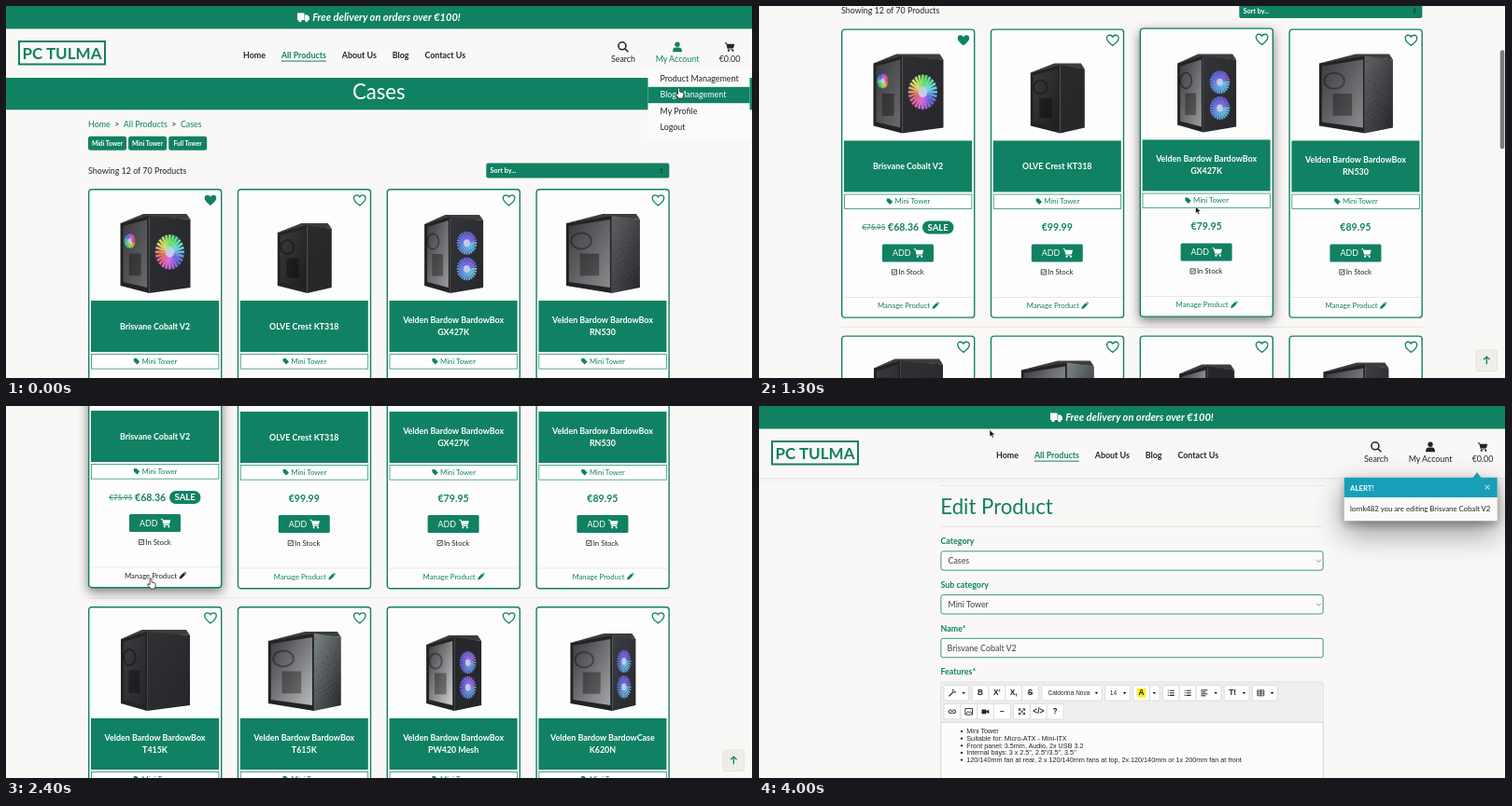
Write an HTML page that moves like this. It is 800 px wide and 399 px high and loops after 4300 ms.

```html
<!DOCTYPE html>
<html lang="en">
<head>
<meta charset="utf-8">
<title>Shop admin demo</title>
<style>
html, body { margin: 0; width: 100%; height: 100%; overflow: hidden; background: #faf8f6; }
svg { display: block; }
text { font-family: Lato, sans-serif; fill: #212529; white-space: pre; }
.sans { font-family: "Liberation Sans", Arial, sans-serif; }
.b { font-weight: 700; }
.i { font-style: italic; }
.m { text-anchor: middle; }
.g { fill: #118163; }
.w { fill: #fff; }
.card.hover { filter: drop-shadow(0 4px 6px rgba(0, 0, 0, .5)); }
.row.hover rect { fill: #118163; }
.row.hover text { fill: #fff; }
.manage.hover * { fill: #212529; }
.alert { filter: drop-shadow(0 4px 5px rgba(0, 0, 0, .3)) drop-shadow(0 12px 16px rgba(0, 0, 0, .4)); }
</style>
</head>
<body>
<svg id="stage" width="800" height="399" viewBox="0 0 800 399"></svg>
<script>
const GREEN = '#118163', DARK = '#212529', PAPER = '#faf8f6';
const LOOP = 4300, STEP = 100;

const txt = (x, y, s, cls = '', size = 8.89, more = '') =>
  `<text x="${x}" y="${y}" class="${cls}" font-size="${size}" ${more}>${s}</text>`;
const rect = (x, y, w, h, fill, more = '') =>
  `<rect x="${x}" y="${y}" width="${w}" height="${h}" fill="${fill}" ${more}/>`;
const poly = (pts, fill) => `<polygon points="${pts.join(' ')}" fill="${fill}"/>`;
const group = (body, more = '') => `<g ${more}>${body}</g>`;
const rule = (x1, y, x2, color = '#e4e1de') =>
  `<path d="M${x1} ${y}H${x2}" stroke="${color}" stroke-width=".8"/>`;
// Words on one line, each following the last after a gap
const flow = (x, y, words, gap, cls, lit) => txt(x, y, words.map((s, n) =>
  `<tspan dx="${n && gap}"${lit(n) ? ` fill="${GREEN}" style="fill:${GREEN}"` : ''}>${s}</tspan>`).join(''), cls);

const dot = (x, y, r) => `<circle cx="${x}" cy="${y}" r="${r}"/>`;
const stroke = (d, w) => `<path d="${d}" fill="none" stroke="currentColor" stroke-width="${w}"/>`;
const solid = d => `<path d="${d}"/>`;
const HEART = 'M0 5.6C-9-.5-6.6-5.5-3.3-5.5Q-1-5.5 0-3.6Q1-5.5 3.3-5.5C6.6-5.5 9-.5 0 5.6Z';
const ICONS = {
  truck: solid('M-6.5-4.5h7.5v7.5h-7.5zM1.6-2.6h2.7l2.2 2.6v3h-4.9z') + dot(-3.5, 3.6, 1.7) + dot(3.4, 3.6, 1.7),
  search: stroke('M2 2L5.3 5.3M2.9-1.2A4 4 0 1 1-5.1-1.2A4 4 0 1 1 2.9-1.2', 1.6),
  user: dot(0, -2.8, 2.7) + solid('M-5 5.3q0-4.8 3-4.8h4q3 0 3 4.8z'),
  cart: stroke('M-5.2-4.2h1.8l1.6 6.2h5.6', 1) + solid('M-3.2-3.2h8.4l-1.1 4.2h-6.2z') + dot(-1.2, 3.8, 1.1) + dot(3.3, 3.8, 1.1),
  tag: solid('M-3.2-3.2h3l3.4 3.4-2.9 3-3.5-3.4z'),
  pencil: solid('M-3.2 3.2l.7-2.5 3.6-3.6 1.8 1.8-3.6 3.6zM1.6-3.3l.7-.6 1.6 1.6-.6.8z'),
  check: stroke('M-2.6-2.6h5.2v5.2h-5.2zM-1.4-.2l1 1.1 2-2.3', .8),
  up: stroke('M0 4.2V-3.8M-3.2-.7L0-3.9 3.2-.7', 1.3),
  heart: stroke(HEART, 1.3),
  love: solid(HEART),
  wand: stroke('M-3.5 3.5l5-5M1-4v2M4-1h-2', 1.2),
  link: stroke('M-.5-1.8h-1.5a1.8 1.8 0 0 0 0 3.6h1.5M.5-1.8h1.5a1.8 1.8 0 0 1 0 3.6h-1.5M-1.5 0h3', 1),
  photo: stroke('M-3.8-3.3h7.6v6.6h-7.6zM-2.8 2.2l2-2.5 1.5 1.5 1.2-1.2 1.4 2.2', .9),
  video: solid('M-4-2.4h5v4.8h-5zM.5 0l3.3-2.4v4.8z'),
  expand: stroke('M-3-3l6 6M3-3l-6 6M-3-1v-2h2M1-3h2v2M-3 1v2h2M1 3h2v-2', .9),
  list: stroke('M-1.5-2.6h5M-1.5 0h5M-1.5 2.6h5M-3.5-2.6h1M-3.5 0h1M-3.5 2.6h1', 1.1),
  align: stroke('M-3.5-3h7M-3.5-1h5M-3.5 1h7M-3.5 3h5', 1),
  grid: stroke('M-3.5-3h7v6h-7zM-3.5-1h7M-3.5 1h7M0-3v6', .8)
};
const icon = (name, x, y, color = GREEN, k = 1) =>
  group(ICONS[name], `transform="translate(${x} ${y}) scale(${k})" fill="${color}" color="${color}"`);

function header(icons, open) {
  const tools = [[661, 'Search', 'search'], [719, 'My Account', 'user'], [775, '€0.00', 'cart']];
  return rect(0, 77, 800, 1.5, '#000', 'opacity=".05"') + rect(0, 78.5, 800, 4, '#000', 'opacity=".02"') +
    rect(0, 24, 800, 53, PAPER) + rect(0, 0, 800, 24.5, GREEN) +
    txt(icons ? 407.5 : 400, 16, 'Free delivery on orders over €100!', 'b i w m', 11.1) +
    (icons ? icon('truck', 318.5, 12, '#fff') : '') +
    rect(14, 38, 92, 24.5, 'none', `stroke="${GREEN}" stroke-width="2"`) + txt(60, 56.6, 'PC TULMA', 'b g m', 17) +
    flow(254, 56, ['Home', 'All Products', 'About Us', 'Blog', 'Contact Us'], 17, 'b', n => n === 1) +
    rect(295, 58.6, 48, 1, GREEN) +
    tools.map(([x, label, name]) => {
      const lit = open && name === 'user';
      return txt(x, icons ? 60 : 53.6, label, lit ? 'm g' : 'm') + (icons ? icon(name, x, 44, lit ? GREEN : DARK) : '');
    }).join('');
}

const ROW = 17.4, rowY = n => 69.4 + n * ROW;
function menu() {
  const rows = ['Product Management', 'Blog Management', 'My Profile', 'Logout'];
  return rect(687.5, 66, 109, 77, '#fcfbfa') + rows.map((label, n) =>
    group(rect(687.5, rowY(n), 109, ROW, 'transparent') + txt(700.5, rowY(n) + 11.6, label), 'class="row"')).join('');
}

// Spokes whose hue runs from h to h + span around the ring
function fan(x, y, rx, ry, h, span) {
  const ring = (k, fill) => `<ellipse cx="${x}" cy="${y}" rx="${rx * k}" ry="${ry * k}" fill="${fill}"/>`;
  let s = ring(1, '#2b2f42');
  for (let n = 0; n < 24; n++) {
    const a = n / 24 * Math.PI * 2, c = Math.cos(a) * rx, d = Math.sin(a) * ry;
    s += `<path d="M${x + c * .25} ${y + d * .25}L${x + c * .95} ${y + d * .95}"
      stroke="hsl(${h + span * n / 24} 65% 64%)" stroke-width="${rx * .17}"/>`;
  }
  return s + ring(.3, '#c3cbe6');
}

function mesh(x, y, w, h) {
  let s = '';
  for (let n = 0; n < 50; n++) s += dot(x + n * .618 % 1 * w, y + Math.sqrt(n / 50) * h, .7);
  return group(s, 'opacity=".3"');
}

// A case seen from its corner: glass side, front face and lid
function tower({ w, top, split, glass, face, fans = 0, hue = 190, span = 70 }, n) {
  const l = 72 - w / 2, r = l + w, s = l + w * split, b = 112, h = b - top, side = s - l, front = r - s;
  const fade = (id, from, to) => `<linearGradient id="${id}${n}" x2="1" y2="1"><stop stop-color="${from}"/>` +
    `<stop offset="1" stop-color="${to}"/></linearGradient>`;
  const rear = [l + side * .33, top + h * .34, side * .22, h * .1];
  let out = fade('glass', '#3a3b3e', glass) + fade('face', face, '#26272a') +
    poly([l, top + 10, l + side * .8, top, r - 4, top, r, top + 6, s, top + 3], '#3c3d3f') +
    poly([l, top + 10, s, top + 2, s, b, l, b - 8], '#222325') +
    poly([l + 3, top + 13, s - 2, top + 6, s - 2, b - 6, l + 3, b - 12], `url(#glass${n})`) +
    poly([s, top + 2, r, top + 6, r, b - 6, s, b], `url(#face${n})`) +
    rect(l + side * .3, top + h * .5, side * .42, h * .28, '#000', 'opacity=".35"');
  out += fans === 1 ? fan(...rear, 0, 360)
    : `<ellipse cx="${rear[0]}" cy="${rear[1]}" rx="${rear[2]}" ry="${rear[3]}" fill="none" stroke="#000" stroke-width="2" opacity=".35"/>`;
  if (!fans) out += mesh(s + 2, top + 8, front - 4, h - 18);
  for (let k = 0; k < fans; k++) {
    const y = top + h * (fans === 1 ? .48 : .36 + k * .33);
    out += fan((s + r) / 2, y, front * (fans === 1 ? .37 : .32), h * (fans === 1 ? .23 : .155), hue, span);
  }
  return out;
}

const goods = [
  { title: ['Brisvane Cobalt V2'], price: '€68.36', was: '€75.95', w: 75, top: 27, split: .41, glass: '#6a6a6c', face: '#2e2f33', fans: 1, hue: 200, span: 360 },
  { title: ['OLVE Crest KT318'], price: '€99.99', w: 58, top: 37, split: .55, glass: '#1e1e1f', face: '#2a2a2b' },
  { title: ['Velden Bardow BardowBox', 'GX427K'], price: '€79.95', w: 63, top: 28, split: .44, glass: '#9a9b9d', face: '#34353a', fans: 2 },
  { title: ['Velden Bardow BardowBox', 'RN530'], price: '€89.95', w: 79, top: 27, split: .62, glass: '#8a8b8d', face: '#606164' },
  { title: ['Velden Bardow BardowBox', 'T415K'], w: 74, top: 25, split: .38, glass: '#26282b', face: '#303133' },
  { title: ['Velden Bardow BardowBox', 'T615K'], w: 78, top: 27, split: .63, glass: '#b8babc', face: '#7c8587' },
  { title: ['Velden Bardow BardowBox', 'PW420 Mesh'], w: 59, top: 31, split: .51, glass: '#d0d1d2', face: '#26272b', fans: 2, hue: 205 },
  { title: ['Velden Bardow BardowCase', 'K620N'], w: 70, top: 29, split: .64, glass: '#a4a6a8', face: '#3c3e42', fans: 2 }
];
const cardX = n => 88 + n % 4 * 159.8;
const cardY = n => n < 4 ? 196 : 525;
const CARD_W = 143, CARD_H = 310, MID = 71.5;

function buy({ price, was }) {
  const cost = was
    ? txt(22.5, 216, was, 'g', 7.9, 'text-decoration="line-through"') + txt(50, 217, price, 'b g', 10.6) +
      rect(87, 206, 33.5, 14, GREEN, 'rx="7"') + txt(103.7, 216.4, 'SALE', 'b w m', 9.6)
    : txt(MID, 216.5, price, 'b g m', 10.6);
  return cost + rect(44, 231, 55, 19, GREEN, 'rx="1.5"') + txt(55, 243.8, 'ADD', 'w') + icon('cart', 83, 240.5, '#fff') +
    icon('check', 57, 261, DARK) + txt(61.3, 264, 'In Stock', '', 7.78) + rule(2, 288, 141) +
    group(txt(39, 300, 'Manage Product', 'g', 7.78) + icon('pencil', 101, 297, 'inherit', 1.1), 'class="manage g"');
}

function card(item, n) {
  const { title, price } = item;
  return group(rect(.7, .7, 142, 309, '#fdfdfd', `rx="3" stroke="${GREEN}" stroke-width="1.4"`) + tower(item, n) +
    icon(n ? 'heart' : 'love', 131, 12.3) + rect(3, 120, 137, 55, GREEN) +
    title.map((s, k) => txt(MID, 150.5 + (k - (title.length - 1) / 2) * 13, s, 'b w m')).join('') +
    rect(3.4, 177.6, 136.5, 15.5, '#fff', `stroke="${GREEN}" stroke-width=".7"`) +
    icon('tag', 52, 185.3) + txt(57.5, 188, 'Mini Tower', 'g', 7.78) + (price ? buy(item) : ''), 'class="card"');
}

function shop() {
  const tag = (s, n) => rect(88 + n * 43.1, 139.7, 41, 15, GREEN, 'rx="2.5"') + txt(108.5 + n * 43.1, 149.6, s, 'b w m', 6.67);
  return flow(88, 130, ['Home', '&gt;', 'All Products', '&gt;', 'Cases'], 4.5, '', n => n % 2 === 0) +
    ['Midi Tower', 'Mini Tower', 'Full Tower'].map(tag).join('') +
    txt(88, 180, 'Showing 12 of 70 Products') + rect(514.3, 168.6, 196, 16, GREEN, 'rx="2"') +
    txt(518.5, 179.3, 'Sort by...', 'b w', 7.2) +
    group(solid('M700.5 176l1.5-2.4 1.5 2.4zM700.5 177.4l1.5 2.4 1.5-2.4z'), 'fill="#0a4435"') +
    rule(88, 516, 711) + goods.map(card).join('') +
    header(true, true) + rect(0, 77, 800, 34.3, GREEN) + txt(399.3, 100, 'Cases', 'w m', 22.2) + menu();
}

function field(y, label, value, pick) {
  return txt(194.5, y, label, 'b g') + rect(194.9, y + 7.6, 409.2, 20.4, '#fcfbfa', `rx="2.3" stroke="${GREEN}" stroke-width=".8"`) +
    txt(pick ? 202.5 : 201.5, y + 21, value, '', 8.89, 'fill-opacity=".88"') +
    (pick ? `<path d="M597.3 ${y + 17}l2.2 2 2.2-2" fill="none" stroke="#777" stroke-width=".9"/>` : '');
}

// Button groups laid out left to right; a trailing ▾ adds a caret
function toolbar(y, groups) {
  let x = 198, s = '';
  for (const keys of groups) {
    for (const key of keys) {
      const caret = key.endsWith('▾'), label = key.replace('▾', '');
      const face = label ? Math.max(17.8, label in ICONS ? 0 : label.length * 3.95) : 1.5;
      const w = face + (caret ? 9 : 0), mid = x + face / 2, long = label.length > 5;
      s += rect(x, y, w, 16.6, '#fff', 'rx="1.4" stroke="#d2d1d0" stroke-width=".7"');
      if (label === 'A') s += rect(mid - 4.3, y + 3.6, 8.6, 9.5, '#ffee00');
      s += label in ICONS ? icon(label, mid, y + 8.4, DARK)
        : txt(mid + (long ? 1.5 : 0), y + 11, label.replace('<', '&lt;'), 'sans m', long ? 6.5 : /\d/.test(label) ? 6.7 : 8.3,
          `font-weight="${long || /\d/.test(label) ? 400 : 700}"${label === 'S' ? ' text-decoration="line-through"' : ''}`);
      if (caret) s += solid(`M${x + w - 7.4} ${y + 7.6}h3.4l-1.7 2z`);
      x += w;
    }
    x += 3.4;
  }
  return s;
}

function editor() {
  const notes = ['Mini Tower', 'Suitable for: Micro-ATX - Mini-ITX', 'Front panel: 3.5mm, Audio, 2x USB 3.2',
    'Internal bays: 3 x 2.5", 2.5"/3.5", 3.5"',
    '120/140mm fan at rear, 2 x 120/140mm fans at top, 2x 120/140mm or 1x 200mm fan at front'];
  return rect(194.8, 296.2, 409.4, 110, '#fdfcfc', 'stroke="#cfcdcb" stroke-width=".8" rx="2"') +
    rect(195.2, 296.6, 408.6, 42.6, '#f1efee') + rule(195, 339.3, 604, '#cfcdcb') +
    toolbar(299.4, [['wand▾'], ['B', 'X’', 'X,', 'S'], ['Caldorina Nova▾'], ['14▾'], ['A', '▾'], ['list', 'list', 'align▾'], ['T!▾'], ['grid▾']]) +
    toolbar(319.4, [['link', 'photo', 'video', '–'], ['expand', '</>', '?']]) +
    notes.map((s, n) => dot(217, 349 + n * 7.65, 1.1) + txt(222.3, 351.3 + n * 7.65, s, 'sans', 7.22)).join('');
}

function edit() {
  const box = rect(626.7, 76.7, 164, 46.5, '#fbfaf8', 'rx="1"');
  const note = rect(626.7, 76.7, 164, 21.3, '#189fb7') + poly([764.5, 77, 769, 71, 773.5, 77], '#189fb7') +
    txt(633, 90.5, 'ALERT!', 'b w', 7.78) + txt(780, 91, '×', 'b m', 12, 'style="fill:#a9dce5"') +
    txt(633, 113.3, 'lornk482 you are editing Brisvane Cobalt V2', '', 7.78);
  return rect(0, 0, 800, 399, PAPER) + group(header(false), 'id="bare"') + group(header(true), 'id="full"') +
    rule(194.5, 85.5, 604.5) + txt(194.3, 115.6, 'Edit Product', 'g', 22.2) + rule(194.5, 129.3, 604.5) +
    field(148.2, 'Category', 'Cases', true) + field(195, 'Sub category', 'Mini Tower', true) +
    field(241.7, 'Name*', 'Brisvane Cobalt V2') + txt(194.5, 288.3, 'Features*', 'b g') +
    group(editor(), 'id="editor"') + group(box, 'class="alert"') + group(note, 'id="note"');
}

const HAND = 'M-1 1q0-1.2 1-1.2t1 1.2v3l3.2.8q1.4.4 1.1 2l-.8 4.2h-4.6l-3.1-4q-.6-1.4.8-1.2l1.4 1z';
const ARROW = 'M0 0v7.6l1.8-1.6 1.2 2.7 1.4-.6-1.2-2.6h2.5z';
const stage = document.getElementById('stage');
stage.innerHTML = group(shop(), 'id="shop"') +
  group(rect(768, 369, 22.5, 22.5, '#efede9', 'rx="2.5" stroke="#dedbd7" stroke-width=".7"') + icon('up', 779.3, 380), 'id="toTop"') +
  rect(793.7, 0, 4.6, 106, '#000', 'id="thumb" rx="2.3"') +
  group(edit(), 'id="edit"') + rect(799, 0, 1, 399, '#111') +
  group(`<path id="hand" d="${HAND}" fill="#fff" stroke="#222" stroke-width=".8"/>` +
    `<path id="arrow" d="${ARROW}" fill="#111" stroke="#fff" stroke-width=".6"/>`, 'id="cursor"');

const el = id => document.getElementById(id);
const all = cls => [...stage.querySelectorAll(cls)];
const show = (id, on) => el(id).style.display = on ? '' : 'none';
const cards = all('.card'), rows = all('.row'), links = all('.manage');

const part = (t, from, to) => Math.min(1, Math.max(0, (t - from) / (to - from)));
const smooth = p => p * p * (3 - 2 * p);

// Quick start, long soft stop
const scrollAt = t => 310 * (1 - (1 - part(t, 1000, 1700) ** 2.9) ** 9);

// Pointer glides: start, end, x, y
const glides = [[100, 600, 727, 79], [600, 1100, 467.5, 215], [1800, 2400, 155, 185], [3600, 4000, 247, 25.5]];
function pointer(t) {
  let x = 720.5, y = 88;
  for (const [from, to, tx, ty] of glides) {
    const p = smooth(part(t, from, to));
    x += (tx - x) * p;
    y += (ty - y) * p;
  }
  return [x, y];
}

function draw(t) {
  const scroll = scrollAt(t), [x, y] = pointer(t), py = y + scroll;
  const editing = t >= 3100;
  let hand = editing && t < 3400;
  show('shop', !editing);
  show('edit', editing);
  show('toTop', !editing && scroll > 20);
  show('bare', t < 3200);
  show('full', t >= 3200);
  show('note', t >= 3200);
  show('editor', t >= 3300);
  el('shop').setAttribute('transform', `translate(0 ${-scroll})`);
  el('thumb').setAttribute('y', scroll * .275);
  el('thumb').setAttribute('opacity', t < 1100 ? 0 : .5 * (1 - part(t, 2000, 2300)));

  cards.forEach((c, n) => {
    const dx = x - cardX(n), dy = py - cardY(n);
    const on = !editing && dx > 0 && dx < CARD_W && dy >= -.5 && dy < CARD_H;
    c.classList.toggle('hover', on);
    c.setAttribute('transform', `translate(${cardX(n)} ${cardY(n) - on})`);
    if (!links[n]) return;
    const over = on && dx > 38 && dx < 106 && dy > 290 && dy < 304;
    links[n].classList.toggle('hover', over);
    hand = hand || over;
  });
  rows.forEach((r, n) => {
    const on = !editing && x > 687 && py >= rowY(n) && py < rowY(n + 1);
    r.classList.toggle('hover', on);
    hand = hand || on;
  });
  show('hand', hand);
  show('arrow', !hand);
  el('cursor').setAttribute('transform', `translate(${x} ${y})`);
}

const start = performance.now();
let last = -1;
function tick() {
  const t = Math.floor((performance.now() - start) % LOOP / STEP) * STEP;
  if (t !== last) draw(last = t);
  requestAnimationFrame(tick);
}
tick();
</script>
</body>
</html>
```
